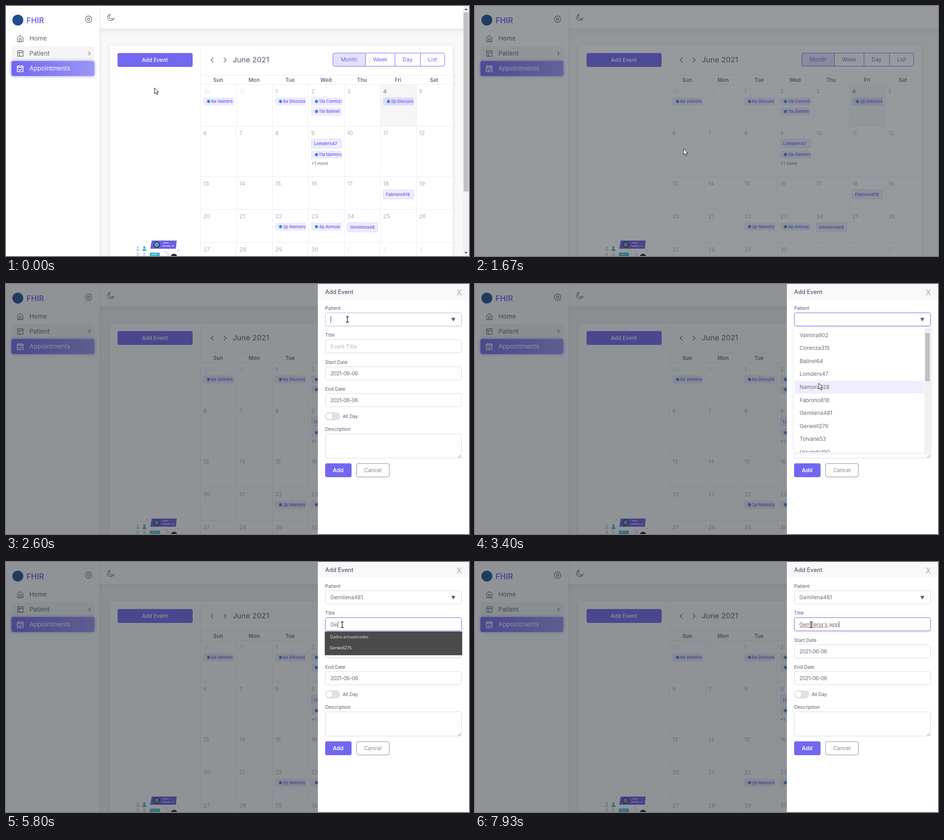
Recreate the animation shown at these times as an HTML page. Size 1017x550 px, loop 8000 ms.

```html
<!DOCTYPE html>
<html lang="en">
<head>
<meta charset="utf-8">
<title>Appointments</title>
<style>
html, body { margin: 0; width: 100%; height: 100%; overflow: hidden; background: #f8f8f8; }
svg { display: block; width: 1017px; height: 550px; }
text { font-family: Inter, "Open Sans", sans-serif; white-space: pre; }
.sans { font-family: "Open Sans", "Noto Sans", sans-serif; }
</style>
</head>
<body>
<svg id="stage" viewBox="0 0 1017 550"></svg>
<script>
const PURPLE = '#7367f0', INK = '#6e6b7b', HEAD = '#5e5873', LINE = '#ebe9f1', EDGE = '#d8d6de';
const NAME = 'Gemilena481', TITLE = "Gemilena's app";

// y is the middle of the capital letters
const text = (x, y, s, size, fill = INK, attrs = '') =>
  `<text x="${x}" y="${y + size * .364}" font-size="${size}" fill="${fill}" ${attrs}>${s}</text>`;
const rect = (x, y, x2, y2, fill, attrs = '') =>
  `<rect x="${x}" y="${y}" width="${x2 - x}" height="${y2 - y}" fill="${fill}" ${attrs}/>`;
const path = (d, stroke = INK, attrs = '') =>
  `<path d="${d}" fill="none" stroke="${stroke}" stroke-width="1.3" ${attrs}/>`;
const dot = (x, y, r, fill) => `<circle cx="${x}" cy="${y}" r="${r}" fill="${fill}"/>`;
const mid = 'text-anchor="middle"';

function sidebar() {
  const items = ['Home', 'Patient', 'Appointments'];
  return rect(0, 0, 205, 550, '#fff', 'filter="url(#soft)"') +
    dot(26, 31, 12, '#1f4e8c') +
    text(45, 31.5, 'FHIR', 17, PURPLE, 'font-weight="600"') +
    path('M174.5 29a7 7 0 1 0 14 0a7 7 0 1 0-14 0m4.5 0a2.5 2.5 0 1 0 5 0a2.5 2.5 0 1 0-5 0') +
    rect(12, 88, 194, 120, '#f5f5f5', 'rx="4"') +
    rect(12, 121, 194, 154, PURPLE, 'rx="4" opacity=".7" filter="url(#glow)"') +
    rect(12, 121, 194, 154, 'url(#active)', 'rx="4"') +
    path('M25.5 70l6-5l6 5v8.5h-12zM29.5 78v-6h4v6') +
    path('M25.5 98.5h12v12h-12zM25.5 102.5h12M29.5 102.5v8') +
    path('M181.5 101l3.5 3.5l-3.5 3.5') +
    path('M25 132.5h12.5v12h-12.5zM25 135h12.5M28 130v3M34.500 130v3M28 139.500l2.500 2.500l4.500-4.500', '#fff', 'style="stroke-width:1.7"') +
    items.map((s, i) => text(51.5, 71 + i * 33, s, 13.6, i == 2 ? '#fff' : '#625f6e')).join('');
}

const cols = [427, 506, 585, 664, 743, 822, 901, 981];
const rows = [172, 264, 375, 447, 520, 593];

function chip(col, y, s, today) {
  const x = cols[col] + 6.5;
  return rect(x - .5, y - 9, x + 67.5, y + 9, PURPLE, `rx="3" opacity="${today ? .17 : .12}"`) +
    dot(x + 11.5, y, 3.4, '#3788d8') +
    `<svg x="${x}" y="${y - 10}" width="67" height="20">` +
    text(17, 10, s, 9.3, PURPLE, 'font-weight="600"') + '</svg>';
}

function block(col, y, s) {
  const x = cols[col] + 6.5;
  return rect(x, y - 10.5, x + 67, y + 10, '#eeedfd', 'rx="3" stroke="#dcd9fb"') +
    `<svg x="${x}" y="${y - 10}" width="61" height="20">` +
    text(6, 10, s, 9.3, PURPLE, 'font-weight="600"') + '</svg>';
}

function calendar() {
  let s = rect(228, 87, 981, 600, '#fff', 'rx="4" filter="url(#soft)"') +
    rect(228, 87, 981, 600, '#fff', 'rx="4"') +
    rect(245, 103.5, 410, 134, PURPLE, 'rx="4"') +
    text(327, 119, 'Add Event', 11.7, '#fff', mid + ' font-weight="500"') +
    path('M455.5 114l-5 5l5 5M478.5 114l5 5l-5 5', INK, 'style="stroke-width:1.6"') +
    text(498, 118.500, 'June 2021', 16.4, HEAD) +
    rect(718, 104, 789, 132.500, '#e3e1fc', 'rx="3"') +
    rect(718, 103.500, 963.500, 132.500, 'none', `rx="4" stroke="${PURPLE}"`) +
    path('M789.500 104v28M854.500 104v28M910.500 104v28', PURPLE, 'style="stroke-width:1"');
  [['Month', 753.5], ['Week', 822], ['Day', 882], ['List', 937]].forEach(([label, x]) =>
    s += text(x, 117.8, label, 12, PURPLE, mid));
  s += rect(822, 172, 901, 264, '#f6f6f6');
  let grid = 'M427 152.5H981';
  rows.forEach(y => grid += `M427 ${y + .5}H981`);
  cols.slice(1, 7).forEach(x => grid += `M${x + .5} 172V550`);
  s += path(grid + 'M427 87V550', LINE, 'style="stroke-width:1"');
  ['Sun', 'Mon', 'Tue', 'Wed', 'Thu', 'Fri', 'Sat'].forEach((d, i) =>
    s += text(cols[i] + 39, 162.5, d, 11.4, INK, mid + ' font-weight="600"'));
  for (let i = 0; i < 35; i++) {
    const day = i < 2 ? 30 + i : (i - 2) % 30 + 1;
    const fill = i < 2 || i > 31 ? '#e2e1e5' : day == 4 ? INK : '#adabb5';
    s += text(cols[i % 7] + 6.5, rows[i / 7 | 0] + 15.5, day, 12.2, fill);
  }
  return s +
    chip(0, 210, '9a Valmira') + chip(2, 210, '6a Discuss') +
    chip(3, 210, '11a Corenza') + chip(3, 232, '11a Balinel') + chip(5, 210, '2p Discuss', true) +
    block(3, 303, 'Lomders47') + chip(3, 327, '11a Namoru7') +
    text(670.5, 346, '+1 more', 9.8) +
    block(5, 414.5, 'Fabrono618') + chip(2, 485.5, '2p Namoru7') +
    chip(3, 485.5, '4p Annual') + block(4, 487, 'Gemilena48') + art();
}

function art() {
  const person = (x, y, c) => dot(x, y - 3, 2.6, c) +
    `<path d="M${x - 4.5} ${y + 5}q0-5 4.500-5t4.500 5z" fill="${c}"/>`;
  return person(289.5, 534, '#d5d7de') + person(304, 534, '#3fb6d3') +
    person(289.5, 547.5, '#d5d7de') + person(304, 547.5, '#d5d7de') +
    '<path d="M320 516h55l-2 18h-56z" fill="#6c5fe0"/>' +
    dot(331, 525, 7, '#2f2c62') + dot(331, 525, 5, '#43bcc4') + dot(331.5, 525, 2.5, '#c9685c') +
    path('M345 521h12M343 528h18M364 528h5', '#e2dffc') +
    rect(316, 542.5, 338, 550, '#43b5d0', 'rx="1"') + path('M320 546.500h12', '#bfe9f2') +
    dot(369, 552, 7, '#25233f') + dot(310, 518.500, 1, PURPLE) + dot(378, 538, 1, PURPLE) +
    path('M349 540l5 2M353 546h5', '#a49cf5');
}

function panel() {
  let s = rect(685, 0, 1017, 550, '#fff') + rect(685, 0, 1017, 34, '#f8f8f8') +
    text(701, 17.5, 'Add Event', 12.7, HEAD, 'font-weight="500"') +
    text(995.5, 18.5, 'X', 17, '#949494', mid + ' font-weight="300"');
  const labels = [['Patient', 53.5], ['Title', 112.5], ['Start Date', 172], ['End Date', 231], ['Description', 319.5]];
  labels.forEach(([label, y], i) => {
    s += text(701, y, label, 10.4, HEAD);
    const top = y + 10;
    s += rect(701.5, top, 1000.5, i == 4 ? 383 : top + 29, '#fff', `id="box${i}" rx="4" stroke="${EDGE}"`);
    if (i == 2 || i == 3) s += text(712.5, top + 14.5, '2021-06-06', 11.5, INK, 'letter-spacing="-.5"');
  });
  return s + '<path d="M978 74.500h9l-4.500 8z" fill="#5e5873"/>' +
    path('M993 382l6-6M997 382l2-2', '#777', 'style="stroke-width:1"') +
    rect(701, 282, 734, 300.5, '#e2e2e2', 'rx="9.2"') + dot(710, 290.8, 6.3, '#fff') +
    text(739.5, 291, 'All Day', 10.3, HEAD) +
    rect(701, 394.5, 759, 425, PURPLE, 'rx="4"') +
    text(729.5, 409.5, 'Add', 12, '#fff', mid + ' font-weight="600"') +
    rect(770, 395, 842, 424.5, '#fff', 'rx="4" stroke="#82868b"') +
    text(806, 409.5, 'Cancel', 11.7, '#82868b', mid) +
    text(712.5, 78, '', 11.8, INK, 'id="patient"') + text(712.5, 137.3, '', 11.8, INK, 'id="title"') +
    path('', '#e03a3a', 'id="wave" style="stroke-width:1"') +
    rect(713, 0, 714, 14, '#444', 'id="caret"');
}

const ROW = 28.6;
function menu() {
  const names = ['Valmira902', 'Corenza315', 'Balinel64', 'Lomders47', 'Namoru728', 'Fabrono618', NAME, 'Gerwell276', 'Tolvane53', 'Ursendo190'];
  return rect(701, 94, 1001, 370, '#fff', 'rx="4" filter="url(#soft)"') +
    '<svg x="701" y="94" width="300" height="276">' + rect(0, 0, 300, 276, '#fff') +
    rect(2, 4, 285, 4 + ROW, '#eeedfd', 'id="hover"') +
    names.map((n, i) => text(12, 18.3 + i * ROW, n, 11.8)).join('') +
    rect(286, 0, 300, 276, '#f1f1f1') + rect(288, 14, 298, 120, '#c1c1c1') + '</svg>';
}

const saved = ['Gerwell276', 'Gadrosa41', 'Corenza315', 'Tolvane53', 'Balinel64', 'Ursendo190', 'Valmira902'];
function popup(count) {
  if (!count) return '';
  const bottom = 181 + count * 23.8;
  return rect(700.5, 153, 1002, bottom, '#4a4a4a', 'filter="url(#soft)"') +
    rect(700.5, 153, 1002, bottom, '#4a4a4a') +
    text(712, 164.5, 'Dados armazenados', 8.8, '#e6e6e6', 'class="sans"') +
    saved.slice(0, count).map((n, i) =>
      text(711, 188.5 + i * 23.8, n, 9.2, '#fff', 'class="sans" font-weight="500"')).join('');
}

const $ = id => document.getElementById(id);
$('stage').innerHTML = `<defs>
  <linearGradient id="active"><stop stop-color="${PURPLE}"/><stop offset="1" stop-color="#9d95f5"/></linearGradient>
  <filter id="soft" x="-10%" y="-30%" width="120%" height="180%"><feDropShadow dx="0" dy="2" stdDeviation="4" flood-color="#22292f" flood-opacity=".1"/></filter>
  <filter id="fall" x="-5%" y="-10%" width="110%" height="200%"><feDropShadow dx="0" dy="5" stdDeviation="7" flood-color="#22292f" flood-opacity=".07"/></filter>
  <filter id="glow" x="-10%" y="-50%" width="120%" height="200%"><feGaussianBlur stdDeviation="3.5"/></filter></defs>` +
  rect(0, 0, 1017, 550, '#f8f8f8') + rect(205, -10, 1030, 49, '#fff', 'filter="url(#fall)"') +
  path('M228.500 18.500a7 7 0 1 0 8.500 8.500a5.800 5.800 0 0 1-8.500-8.500z') +
  calendar() + sidebar() +
  '<g id="scroll">' + rect(1004, 0, 1017, 550, '#f1f1f1') + rect(1005, 14, 1016, 408, '#c1c1c1') +
  '<path d="M1007 9l3.500-4l3.500 4zM1007 541l3.500 4l3.500-4z" fill="#505050"/></g>' +
  rect(0, 0, 1017, 550, '#22292f', 'id="dim"') +
  '<g id="panel">' + panel() + '</g><g id="menu">' + menu() + '</g><g id="popup"></g>' +
  '<g id="cursor"><path id="arrow" d="M0 0V13l3-2.700l2.200 5l2.300-1l-2.200-4.800h4z" fill="#fff" stroke="#111" stroke-width="1"/>' +
  '<g id="beam">' + path('M-3-6h2l1 1l1-1h2M0-5v10M-3 6h2l1-1l1 1h2', '#fff', 'style="stroke-width:2.6" opacity=".7"') +
  path('M-3-6h2l1 1l1-1h2M0-5v10M-3 6h2l1-1l1 1h2', '#111') + '</g></g>';

const clamp = (t, a, b) => Math.min(1, Math.max(0, (t - a) / (b - a)));
const smooth = p => p * p * (3 - 2 * p);
const show = (id, on) => $(id).setAttribute('visibility', on ? 'visible' : 'hidden');

// time, x, y
const route = [[130, 326, 180], [1000, 481, 327], [1070, 481, 327], [1270, 458, 314], [1730, 458, 314],
  [2333, 750, 78], [2730, 750, 78], [3800, 757, 281], [4130, 757, 281], [4600, 740, 138], [4730, 738.5, 138]];
const keys = [5600, 5800, 5930, 6130, 6330, 6470, 6600, 6670, 7070, 7270, 7470, 7600, 7800, 7930];

function pointer(t) {
  let i = route.findIndex(p => p[0] > t);
  if (i < 0) i = route.length;
  const a = route[Math.max(0, i - 1)], b = route[Math.min(i, route.length - 1)];
  const p = a == b ? 0 : smooth(clamp(t, a[0], b[0]));
  return [a[1] + (b[1] - a[1]) * p, a[2] + (b[2] - a[2]) * p];
}

function focus(id, p) {
  const mix = (a, b) => Math.round(a + (b - a) * p);
  $(id).setAttribute('stroke', `rgb(${mix(216, 115)},${mix(214, 103)},${mix(222, 240)})`);
  $(id).style.filter = p ? `drop-shadow(0 2px 3px rgba(34,41,47,${.12 * p}))` : '';
}

function draw(t) {
  const [x, y] = pointer(t);
  const open = t > 2670 && t < 4000;
  const onTitle = t >= 4730;

  show('scroll', t < 1530);
  $('dim').setAttribute('opacity', .5 * clamp(t, 1530, 1680));
  const slide = 1 - clamp(t, 1680, 2000);
  $('panel').setAttribute('transform', `translate(${332 * slide ** 2})`);
  focus('box0', clamp(t, 2540, 2740) - clamp(t, 4730, 4870));
  focus('box1', clamp(t, 4680, 4830));

  show('menu', open);
  $('menu').setAttribute('opacity', clamp(t, 2640, 2800));
  const row = Math.floor((y - 98) / ROW);
  show('hover', open && row >= 0);
  $('hover').setAttribute('y', 4 + Math.max(0, row) * ROW);
  $('patient').textContent = t >= 4000 ? NAME : '';

  const typed = keys.filter(k => k <= t).length;
  const title = $('title');
  title.textContent = typed ? TITLE.slice(0, typed) : 'Event Title';
  title.setAttribute('fill', typed ? INK : '#b9b9c3');
  $('popup').innerHTML = popup(t < 4867 || t >= 5930 ? 0 : t < 5600 ? 7 : t < 5800 ? 2 : 1);

  const since = typed ? keys[typed - 1] : onTitle ? 4730 : 2590;
  const active = onTitle || t >= 2590 && t < 4000;
  show('caret', active && Math.floor((t - since) / 530) % 2 == 0);
  $('caret').setAttribute('y', onTitle ? 130.5 : 71);
  $('caret').setAttribute('x', 713 + (typed ? title.getComputedTextLength() : 0));

  let wave = '';
  if (t >= 7530) {
    const end = 712.5 + title.getSubStringLength(0, 10);
    wave = 'M713 144.5';
    for (let u = 713; u < end; u += 4) wave += 'l2-1.500l2 1.500';
  }
  $('wave').setAttribute('d', wave);

  const beam = x > 701 && (y > 63 && y < 93 || !open && y > 122 && y < 152);
  show('beam', beam);
  show('arrow', !beam);
  $('cursor').setAttribute('transform', `translate(${x} ${y})`);
}

// The screen refreshes 15 times a second
const start = performance.now();
function tick() {
  const t = (performance.now() - start) % 8000;
  draw(Math.floor((t + 5) * 15 / 1000) % 120 * 1000 / 15 + 4);
  requestAnimationFrame(tick);
}
tick();
</script>
</body>
</html>
```
